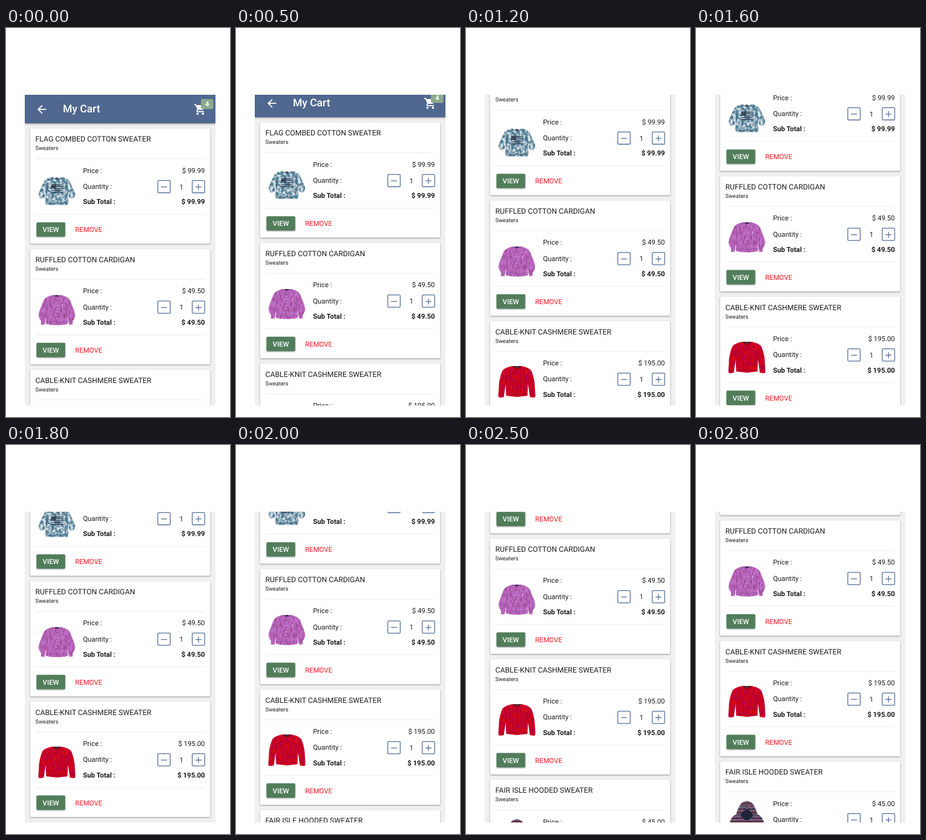
Recreate the animation shown at these times as an HTML page. Size 370 px wide and 641 px high, loop 2.9 s.

```html
<!DOCTYPE html>
<html lang="en">
<head>
<meta charset="utf-8">
<title>My Cart</title>
<style>
  html, body { margin: 0; width: 100%; height: 100%; overflow: hidden; background: #fff; }
  svg { display: block; }
  text { font: 11.375px Roboto, sans-serif; fill: #1c1c1c; text-rendering: geometricPrecision; }
  .title { font-size: 12.25px; }
  .kind { font-size: 9.2px; }
  .end { text-anchor: end; }
  .mid { text-anchor: middle; }
  .bold { font-weight: 700; }
  .medium { font-weight: 500; }
  .white { fill: #fff; }
  .red { fill: #f8191f; }
  .heading { font-size: 17.5px; }
  .bar { fill: #50688f; filter: drop-shadow(0 1.5px 1.5px #0006); }
  .card { fill: #fff; filter: drop-shadow(0 1px 1.2px #0006); }
  .view { fill: #517d5b; filter: drop-shadow(0 1px 1px #0006); }
  .rule { stroke: #ececec; }
  .step { fill: none; stroke: #56709a; stroke-width: 1.3; }
</style>
</head>
<body>
<svg width="370" height="641">
  <defs>
    <filter id="wash" x="0" y="0" width="1" height="1">
      <feTurbulence type="fractalNoise" baseFrequency=".22" numOctaves="3" seed="4"/>
      <feColorMatrix values="0 0 0 0 .72  0 0 0 0 .84  0 0 0 0 .88  3 0 0 0 -1.2"/>
      <feComposite in2="SourceAlpha" operator="in"/>
      <feMerge><feMergeNode in="SourceGraphic"/><feMergeNode/></feMerge>
    </filter>
    <filter id="knit" x="0" y="0" width="1" height="1">
      <feTurbulence type="fractalNoise" baseFrequency=".35 .12" numOctaves="2" seed="7"/>
      <feColorMatrix values="0 0 0 0 .25  0 0 0 0 0  0 0 0 0 .1  1.6 0 0 0 -.6"/>
      <feComposite in2="SourceAlpha" operator="in"/>
      <feMerge><feMergeNode in="SourceGraphic"/><feMergeNode/></feMerge>
    </filter>
    <pattern id="fairIsle" width="6" height="15" patternUnits="userSpaceOnUse">
      <path fill="#2a3450" d="M0 0h6v15H0z"/>
      <path stroke="#d9cdb8" fill="none" d="M0 3l1.5-2L3 3l1.5-2L6 3M0 8h2m1 0h2M0 13l3-2 3 2"/>
      <path stroke="#9c5240" d="M0 5.5h6"/>
      <path stroke="#8296a8" d="M0 10h6" stroke-dasharray="1 1"/>
    </pattern>
  </defs>
  <svg x="31" y="110" width="315" height="512" viewBox="31 110 315 512">
    <path fill="#f0f0f0" d="M31 110h315v512H31z"/>
    <g id="page"></g>
  </svg>
</svg>
<script>
const LOOP = 2900, STEP = 100, PITCH = 198.67;

// Each garment is a left half, mirrored about x = 31.5, plus details on top.
const items = [
  { title: 'FLAG COMBED COTTON SWEATER', price: '99.99', fill: '#4f7d95', filter: 'wash',
    half: 'M32 19Q27 19 24 16Q16 17 11 22Q5 34 1 44Q2 50 6 52L11 50 14 44 12 57 14 62H32z',
    details: `<path fill="#243447" d="M22 28h8v7h-8z"/>
      <path stroke="#2b3d50" stroke-width="1.2" d="M30 29h11M30 32h11M30 35h11M22 38h19M22 41h19"/>
      <path stroke="#9fb6c0" stroke-dasharray="1 1" d="M23 30h6M23 33h6"/>
      <path stroke="#3d647d" fill="none" d="M24 17Q31.5 23 39 17M14 59H49M14 44L15 28M49 44L48 28"/>
      <path fill="#1f2c3a" d="M29 17h5v2h-5z"/>` },
  { title: 'RUFFLED COTTON CARDIGAN', price: '49.50', fill: '#be70c8', filter: 'knit',
    half: 'M32 14L24 12Q14 14 10 20Q3 36 1 45Q2 51 6 55L5 60 11 61 12 56 14 47 13 59Q22 62 32 61z',
    details: `<path fill="#8d4597" d="M24 12h15Q31.5 18 24 12z"/><path fill="#252a45" d="M29 12h5v2h-5z"/>
      <path stroke="#954ea0" fill="none" stroke-width=".8" d="M31.5 16V60M13 55Q31.5 58 50 55M14 47L15 27M49 47L48 27M5 55l7 1M58 55l-7 1"/>
      <path stroke="#f0d5ef" stroke-width="1.2" stroke-dasharray="1.2 4" d="M31.5 18V54"/>
      <path stroke="#eed9f0" d="M41 27v3"/>` },
  { title: 'CABLE-KNIT CASHMERE SWEATER', price: '195.00', fill: '#d60d19', filter: 'knit',
    half: 'M32 14Q27 13 24 10Q13 12 8 17Q3 28 2 40L1 59Q1 62 4 62L10 61Q11 52 13 40L14 59 32 61z',
    details: `<path fill="#7d0a14" d="M24 10h15Q31.5 19 24 10z"/><path fill="#29466e" d="M29 10.5h5v2h-5z"/>
      <path stroke="#a30711" fill="none" d="M24 11Q31.5 20 39 11M14 57H49M13 40L14 24M50 40L49 24M2 57h8M53 57h8"/>
      <path stroke="#a90a14" stroke-dasharray="2 1" d="M19 17V56M25 18V56M31.5 18V56M38 18V56M44 17V56M7 24V56M56 24V56"/>` },
  { title: 'FAIR ISLE HOODED SWEATER', price: '45.00', fill: 'url(#fairIsle)', filter: 'knit',
    half: 'M32 1Q22 2 18 12Q15 18 14 23Q7 26 4 34L1 58 10 60 14 44V62H32z',
    details: `<path fill="#1d2438" d="M31.5 15Q24 17 21 25Q25 32 31.5 33Q38 32 42 25Q39 17 31.5 15z"/>
      <path stroke="#55617c" fill="none" d="M21 25Q25 32 31.5 34Q38 32 42 25"/>` },
];

const text = (x, y, cls, str) => `<text x="${x}" y="${y}" class="${cls}">${str}</text>`;
const rule = y => `<path class="rule" d="M48.5 ${y}H328.5"/>`;
const stepper = (x, icon) => `<rect class="step" x="${x}" y="85.7" width="20.6" height="20.2" rx="1.6"/>
  <path class="step" d="M${x + 5.4} 96.3h9.8${icon}"/>`;

const garment = ({ fill, filter, half, details }) => `<g transform="translate(52.5 64)">
  <g fill="${fill}" filter="url(#${filter})"><path d="${half}"/>
  <path d="${half}" transform="matrix(-1 0 0 1 63 0)"/></g>${details}</g>`;

const card = (item, i) => `<g transform="translate(0 ${165.6 + i * PITCH})">
  <rect class="card" x="39.8" width="297.4" height="190" rx="1.75"/>
  ${text(48.5, 21.6, 'title', item.title)}${text(48.5, 35.6, 'kind', 'Sweaters')}
  ${rule(49.9)}${garment(item)}
  ${text(127.2, 73.2, '', 'Price :')}${text(328.5, 73.2, 'end', '$ ' + item.price)}
  ${text(127.2, 99.5, '', 'Quantity :')}${text(289.7, 100, 'mid', 1)}
  ${stepper(250.7, '')}${stepper(307.6, 'm-4.9-4.9v9.8')}
  ${text(127.2, 124.7, 'bold', 'Sub Total :')}${text(328.5, 124.7, 'end bold', '$ ' + item.price)}
  ${rule(141.4)}
  <rect class="view" x="50.4" y="154.6" width="47.4" height="23.6" rx="1.75"/>
  ${text(74.1, 170.9, 'mid medium white', 'VIEW')}${text(114.2, 170.9, 'red', 'REMOVE')}
</g>`;

const header = `<path class="bar" d="M31 100h315v57H31z"/>
  <path class="white" transform="translate(48.4 123.3) scale(.9)"
    d="M20 11H7.83l5.59-5.59L12 4l-8 8 8 8 1.41-1.41L7.83 13H20z"/>
  ${text(94, 139.3, 'heading medium white', 'My Cart')}
  <path class="white" transform="translate(310 123.4) scale(.9)"
    d="M7 18a2 2 0 1 0 0 4a2 2 0 1 0 0-4zM1 2v2h2l3.6 7.6-1.35 2.4C4.5 15.4 5.5 17 7 17h12v-2H7.4q-.4 0-.2-.4l.9-1.6h7.45q1.2 0 1.75-1l3.6-6.5Q21.4 4 20 4H5.2l-.9-2zM17 18a2 2 0 1 0 0 4a2 2 0 1 0 0-4z"/>
  <rect x="322" y="117" width="20.6" height="16.6" rx="2.5" fill="#8aa98b"/>
  ${text(332.3, 129.3, 'mid bold white', 4)}`;

const page = document.getElementById('page');
page.innerHTML = items.map(card).join('') + header;

// The page rests, then scrolls 10 px on every step.
function draw(now) {
  const step = Math.floor(now % LOOP / STEP);
  page.setAttribute('transform', `translate(0 ${-10 * Math.max(0, step - 4)})`);
  requestAnimationFrame(draw);
}
draw(performance.now());
</script>
</body>
</html>
```
